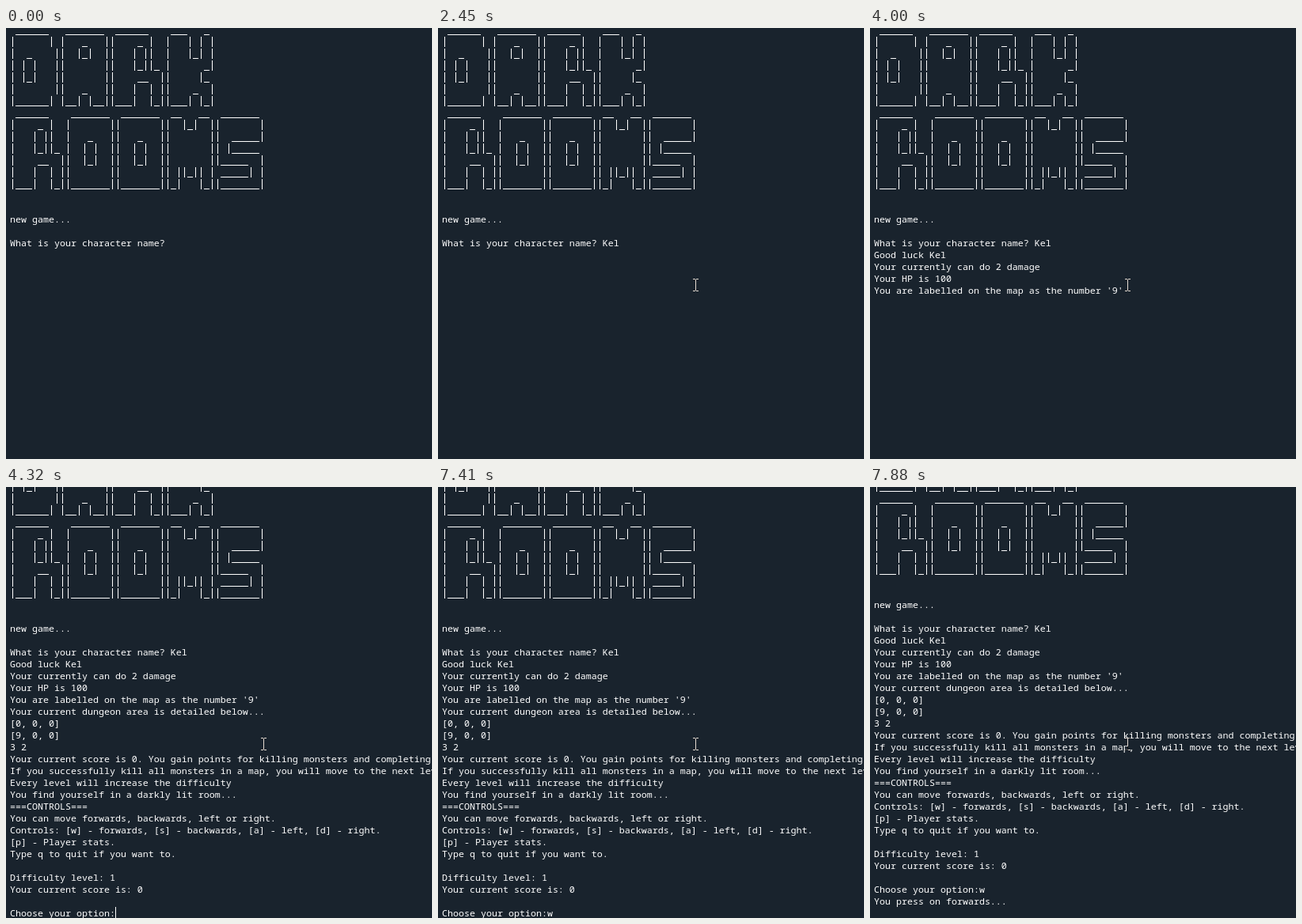
An HTML page with a canvas that plays this animation: 538 by 545 pixels, repeating every 8000 ms.

```html
<!DOCTYPE html>
<html lang="en">
<head>
<meta charset="utf-8">
<title>Dark Rooms</title>
<style>
  html, body { margin: 0; height: 100%; overflow: hidden; background: #19232d; }
  canvas { display: block; }
</style>
</head>
<body>
<canvas id="stage" width="538" height="545"></canvas>
<script>
const LOOP = 8000, LEFT = 5, CELL = 7, LINE = 15, FIRST_TOP = -6;
const PLAYER = "Kel";

const art = String.raw`
 ______   _______  ______    ___   _
|      | |   _   ||    _ |  |   | | |
|  _    ||  |_|  ||   | ||  |   |_| |
| | |   ||       ||   |_||_ |      _|
| |_|   ||       ||    __  ||     |_
|       ||   _   ||   |  | ||    _  |
|______| |__| |__||___|  |_||___| |_|
 ______    _______  _______  __   __  _______
|    _ |  |       ||       ||  |_|  ||       |
|   | ||  |   _   ||   _   ||       ||  _____|
|   |_||_ |  | |  ||  | |  ||       || |_____
|    __  ||  |_|  ||  |_|  ||       ||_____  |
|   |  | ||       ||       || ||_|| | _____| |
|___|  |_||_______||_______||_|   |_||_______|`.split("\n").slice(1);

const lines = [...art, ...`

new game...

What is your character name?\x20
Good luck ${PLAYER}
Your currently can do 2 damage
Your HP is 100
You are labelled on the map as the number '9'
Your current dungeon area is detailed below...
[0, 0, 0]
[9, 0, 0]
3 2
Your current score is 0. You gain points for killing monsters and completing levels
If you successfully kill all monsters in a map, you will move to the next level
Every level will increase the difficulty
You find yourself in a darkly lit room...
===CONTROLS===
You can move forwards, backwards, left or right.
Controls: [w] - forwards, [s] - backwards, [a] - left, [d] - right.
[p] - Player stats.
Type q to quit if you want to.

Difficulty level: 1
Your current score is: 0

Choose your option:
You press on forwards...`.split("\n")];

const NAME_ROW = lines.findIndex(s => s.startsWith("What"));
const OPTION_ROW = lines.length - 2;

// Each track is a list of [start time, value] steps.
const rowTrack = [[0, 19], [2910, 20], [3540, 22], [4000, 23], [4320, 41], [7880, 42]];
const scrollTrack = [[0, 0], [4320, 63], [7560, 78], [7880, 93]];
const nameTrack = [[0, 0], [2150, 1], [2300, 2], [2450, 3]];
const pointerTrack = [[0, null], [280, 318], [600, 317]];
const caretTimes = [[450, 910], [1520, 1980], [2150, 2450], [4320, 4780],
                    [5390, 5850], [6310, 6940], [7240, 7410]];

const valueAt = (track, t) => track.findLast(([start]) => t >= start)[1];

const ctx = document.getElementById("stage").getContext("2d");

function drawArtRow(row, top) {
  [...row].forEach((ch, col) => {
    const x = LEFT + col * CELL;
    if (ch === "_") ctx.fillRect(x, top + 14, CELL, 1);
    if (ch === "|") ctx.fillRect(x + 3, top + 2, 1, 13);
  });
}

function drawPointer(y) {
  ctx.globalCompositeOperation = "difference";
  for (const edge of [y, y + 15]) {
    ctx.fillRect(322, edge, 3, 1);
    ctx.fillRect(326, edge, 3, 1);
  }
  ctx.fillRect(325, y + 1, 1, 14);
  ctx.globalCompositeOperation = "source-over";
}

function draw(t) {
  ctx.fillStyle = "#19232d";
  ctx.fillRect(0, 0, 538, 545);
  ctx.fillStyle = "#fff";
  ctx.font = '11.6667px "Noto Sans Mono", monospace';

  const typed = {
    [NAME_ROW]: PLAYER.slice(0, valueAt(nameTrack, t)),
    [OPTION_ROW]: t >= 7240 ? "w" : ""
  };
  const textOf = row => lines[row] + (typed[row] || "");
  const topOf = row => FIRST_TOP + row * LINE - valueAt(scrollTrack, t);

  for (let row = 0; row < valueAt(rowTrack, t); row++) {
    if (row < art.length) drawArtRow(lines[row], topOf(row));
    else ctx.fillText(textOf(row), LEFT, topOf(row) + 12);
  }

  if (caretTimes.some(([on, off]) => t >= on && t < off)) {
    const row = t < 4320 ? NAME_ROW : OPTION_ROW;
    ctx.fillRect(LEFT + textOf(row).length * CELL, topOf(row), 1, LINE);
  }

  const pointerY = valueAt(pointerTrack, t);
  if (pointerY) drawPointer(pointerY);
}

const begin = performance.now();
function tick() {
  draw((performance.now() - begin) % LOOP);
  requestAnimationFrame(tick);
}
tick();
</script>
</body>
</html>
```
